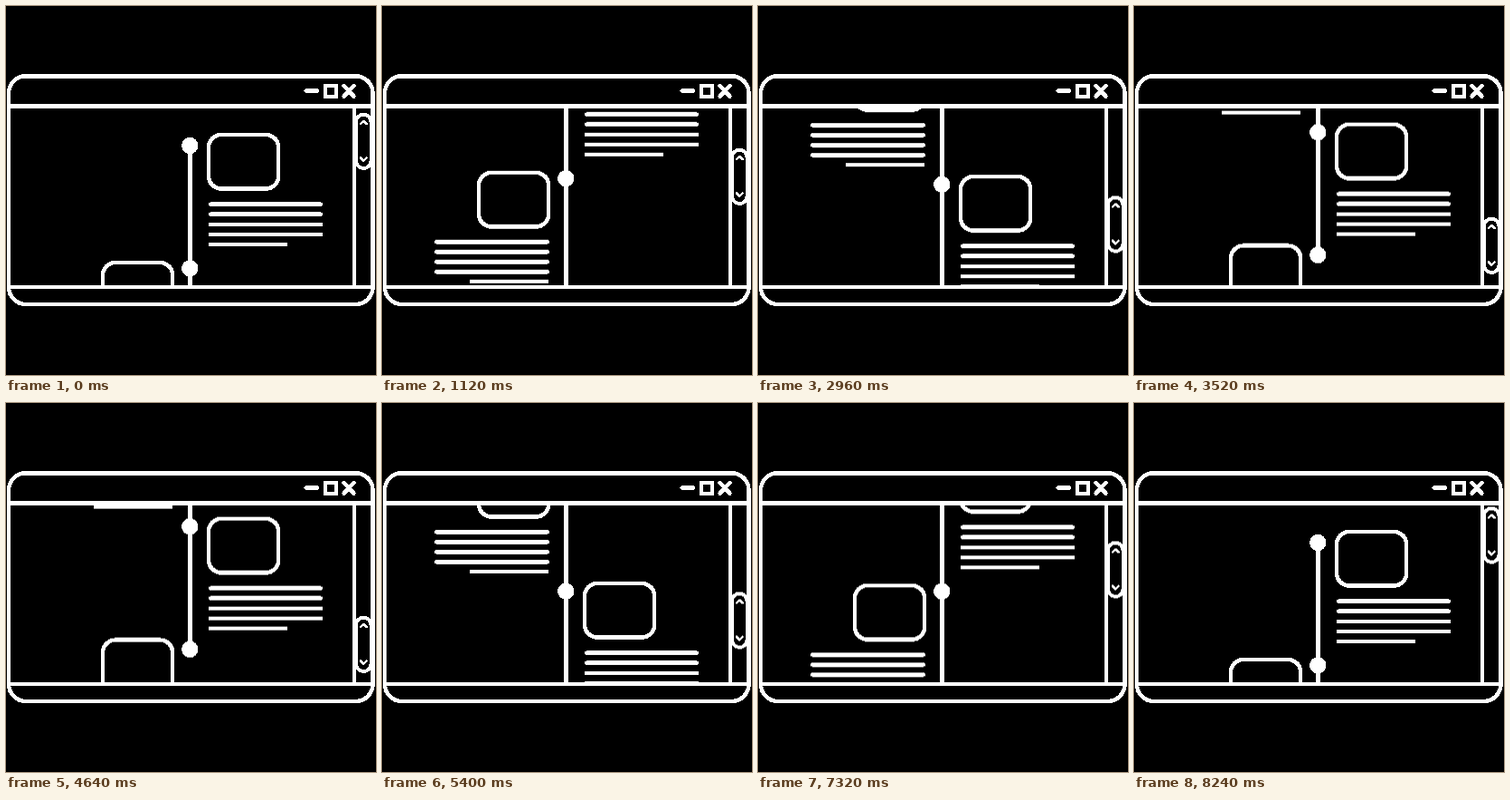
An HTML page that plays this animation: 409 px wide and 407 px high, repeating every 8.96 s.

```html
<!DOCTYPE html>
<html lang="en">
<head>
<meta charset="utf-8">
<title>Scrolling timeline</title>
<style>
  html, body { margin: 0; width: 100%; height: 100%; overflow: hidden; background: #000; }
  svg { display: block; width: 100%; height: 100%; fill: none; stroke: #fff; stroke-width: 4.5; stroke-linecap: round; stroke-linejoin: round; shape-rendering: crispEdges; }
  .dots { fill: #fff; stroke: none; }
  .chevrons { stroke-width: 2.6; }

  /* Every move advances in 40 ms steps; the pauses hold still. */
  #page, #thumb { animation: 8960ms -3ms infinite; }
  #page { animation-name: page; }
  #thumb { animation-name: thumb; }

  @keyframes page {
    0%        { transform: translateY(0); animation-timing-function: steps(28); }
    12.5%     { transform: translateY(-99.2px); animation-timing-function: steps(13); }
    18.3036%  { transform: translateY(-144px); }
    23.6607%  { transform: translateY(-144px); animation-timing-function: steps(7); }
    26.7857%  { transform: translateY(-170.3px); animation-timing-function: steps(28); }
    39.2857%  { transform: translateY(-285.4px); animation-timing-function: steps(8); }
    42.8571%  { transform: translateY(-315.5px); }
    48.6607%  { transform: translateY(-315.5px); animation-timing-function: steps(7); }
    51.7857%  { transform: translateY(-288.4px); animation-timing-function: steps(39); }
    69.1964%  { transform: translateY(-142px); }
    74.1071%  { transform: translateY(-142px); animation-timing-function: steps(40); }
    91.9643%, 100% { transform: translateY(0); }
  }
  @keyframes thumb {
    0%        { transform: translateY(0); animation-timing-function: steps(28); }
    12.5%     { transform: translateY(39px); animation-timing-function: steps(13); }
    18.3036%  { transform: translateY(57px); }
    23.6607%  { transform: translateY(57px); animation-timing-function: steps(7); }
    26.7857%  { transform: translateY(68px); animation-timing-function: steps(28); }
    39.2857%  { transform: translateY(115px); animation-timing-function: steps(8); }
    42.8571%  { transform: translateY(127px); }
    48.6607%  { transform: translateY(127px); animation-timing-function: steps(7); }
    51.7857%  { transform: translateY(117px); animation-timing-function: steps(39); }
    69.1964%  { transform: translateY(62.5px); }
    74.1071%  { transform: translateY(62.5px); animation-timing-function: steps(40); }
    91.9643%, 100% { transform: translateY(-3.5px); }
  }
</style>
</head>
<body>
<svg viewBox="0 0 409 407">
  <defs>
    <clipPath id="view"><rect x="4" y="112" width="400" height="198"/></clipPath>
    <rect id="card" width="77.2" height="59.5" rx="14"/>
    <g id="right">
      <use href="#card" x="224"/>
      <path d="M226 76.7H348M226 87.7H348M226 98.8H348M226 109.8H348M226 120.8H309"/>
    </g>
    <g id="left">
      <use href="#card" x="107"/>
      <path d="M60 76.4H183M60 87.4H183M60 98.4H183M60 109.4H183M99 120H182"/>
    </g>
  </defs>

  <g clip-path="url(#view)">
    <g id="page">
      <path d="M203.4 154V560"/>
      <g class="dots">
        <circle cx="203.3" cy="154" r="9.2"/>
        <circle cx="203.3" cy="289.4" r="9.2"/>
        <circle cx="203.3" cy="424.6" r="9.2"/>
        <circle cx="203.3" cy="560" r="9.2"/>
      </g>
      <use href="#right" y="142"/>
      <use href="#left" y="283"/>
      <use href="#right" y="416"/>
      <use href="#left" y="549.7"/>
    </g>
  </g>

  <g id="thumb">
    <rect x="387" y="119.7" width="16.5" height="59.3" rx="8.2" stroke-width="4"/>
    <path class="chevrons" d="M392 130L395.3 127L398.6 130M392 167.5L395.3 170.5L398.6 167.5"/>
  </g>

  <rect x="3" y="77.3" width="402.5" height="251.7" rx="19"/>
  <path d="M3 110.5H405M3 310H405M385 110.5V310"/>
  <path d="M331.5 93.5H344M373.5 88L384.5 99.5M384.5 88L373.5 99.5"/>
  <rect x="353" y="87.5" width="12.3" height="12.3" stroke-width="4" stroke-linejoin="miter"/>
</svg>
</body>
</html>
```
